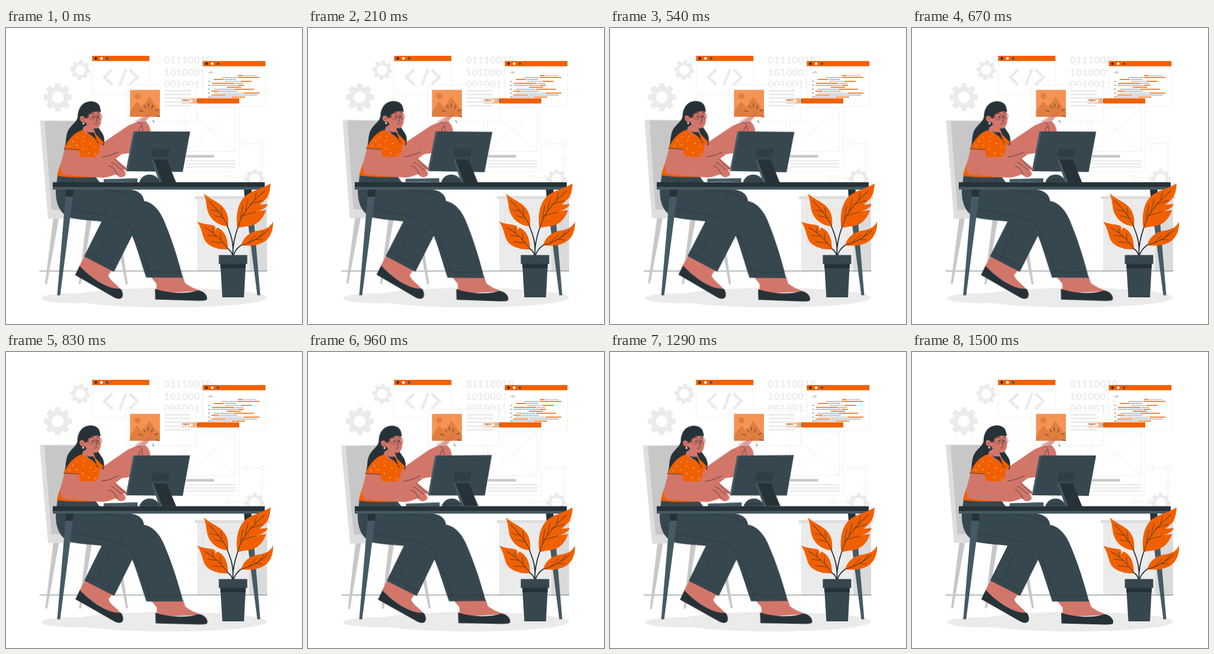
Animation, 500 px wide and 500 px high, one loop 1.54 s. Source, as an HTML page:

```html
<!DOCTYPE html>
<html lang="en">
<head>
<meta charset="utf-8">
<title>At the desk</title>
<style>
html, body { margin: 0; height: 100%; overflow: hidden; background: #fff; }
svg { display: block; width: 100%; height: 100%; }
.body { transform-origin: 200px 292px; }
.device { transform-origin: 238px 218px; }
.or { fill: #f06000; } .dk { fill: #263238; } .md { fill: #37474f; } .lt { fill: #455a64; }
.skin { fill: #d3766a; } .g1 { fill: #ebebeb; } .g2 { fill: #dedede; } .g3 { fill: #c7c7c7; }
.ln { fill: none; stroke: #263238; stroke-linecap: round; stroke-linejoin: round; }
.thin { fill: none; stroke: #ebebeb; }
.win { fill: #fff; stroke: #ebebeb; stroke-width: .7; }
.bin { font: 700 17.5px Lato, sans-serif; fill: #ebebeb; }
</style>
</head>
<body>
<svg viewBox="0 0 500 500">
  <g id="gears" class="g1" fill-rule="evenodd"></g>
  <g class="bin">
    <text x="266.500" y="60">01110010</text>
    <text x="266.500" y="80.500">10100011</text>
    <text x="266.500" y="101">00100110</text>
  </g>

  <!-- wireframe -->
  <path class="thin" stroke-width=".8" d="M407 195.500H429M432.500 199V220.500M432.500 227.500V253H379M400 192h7v7h-7zM429 192h7v7h-7zM429 220.500h7v7h-7zM371.500 249.500h7v7h-7zM400 249.500h7v7h-7z"/>

  <!-- windows -->
  <rect class="win" x="145.500" y="47.500" width="96.700" height="64"/>
  <g class="thin" stroke-width="4.600"><path d="M179.500 70L166 83l13.500 13M208.500 70L222 83l-13.500 13M203 69l-11 28"/></g>
  <rect class="win" x="297" y="119" width="97" height="123.500"/>
  <path class="thin" stroke-width=".8" d="M303.500 135h84v73.500h-84zl84 73.500M387.500 135l-84 73.500"/>
  <rect class="g3" x="304" y="214.500" width="47.500" height="4.300"/>
  <path class="thin" stroke-width="2.500" d="M304 224.300h83.500M304 229.500h83.500M304 234.700h83.500"/>
  <rect class="win" x="332.500" y="56" width="106" height="76"/>
  <g id="bars"></g>
  <text x="341.500" y="77" font-family="Lato, sans-serif" font-size="5" font-weight="700" fill="#f06000">&lt;<tspan fill="#263238">/</tspan>&gt;</text>
  <g id="code" fill="none" stroke-width="1.500"></g>

  <!-- cabinet -->
  <path class="g1" d="M323 288h88v123h-88z"/>
  <path fill="#dadada" d="M411 288h30v123h-30z"/>
  <path class="g2" d="M319 284h126v5H319z"/>
  <path fill="none" stroke="#dcdcdc" stroke-width=".8" d="M332.500 305.500h69v59.500h-69z"/>
  <path class="g3" d="M357 365h15v9h-15z"/>
  <path class="ln" stroke-width=".6" d="M57 410.500H441"/>
  <g class="g1"><ellipse cx="117" cy="456.500" rx="58" ry="8.500"/><ellipse cx="275" cy="455.500" rx="166" ry="16.500"/></g>

  <g class="body">
    <!-- chair -->
    <path class="g3" d="M80 321h9.500L69.500 433H66zM136.500 321h9L126.500 433H123zM180 321h9l17 112h-3.500z"/>
    <path class="g2" d="M57 156.500h70L149 322.500H71z"/>
    <path class="g3" d="M65 157.500h62l20 150H77z"/>

    <!-- far leg and feet -->
    <path class="skin" d="M133 386l46 23-6 9c3 9 15 15 21 24-16 1-47-17-70-40z"/>
    <path class="dk" d="M124.500 402c20 21 48 39 66.500 38.500 4-1.500 7 6 6.500 11-.5 6.500-7 7.500-14 4L117 417.500z"/>
    <path class="md" d="M163 324l-31 62 50.500 26 31-62-14-24z"/>
    <path class="ln" stroke-width=".7" d="M136.500 379l49 25M179 333c-12 18-19 33-24 48"/>
    <path class="skin" d="M244 419h55l3.500 11c8 7 18 10 26 14l-74 4v-16z"/>
    <path class="dk" d="M252 440.500c24 8 54 9 73 2.500 9 1 15 7 15 13.500 0 3.500-3 4-15 4l-72.500-2z"/>

    <!-- near leg -->
    <path class="md" d="M87 249l64 2 14 19 45 3c14 1 23 10 23 19 14 2 26 15 33 31 14 32 25 68 33 98.500h-62c-9-26-17-56-26-75-4-10-11-13-26-16-25-5-55-5-75-9.500-18-6-26-22-26-46z"/>
    <path class="ln" stroke-width=".7" d="M92 295c18 17 82 18 111 32 14 15 29 52 39 83M236 410.500c22 2 42 2 60 1M98 253c-2 8-3 14-3 20M113 253c-2 8-2 14-1 20M141 254l2 9M165 274c30 1 54 8 66 18"/>

    <!-- raised arm -->
    <path class="skin" d="M150 197l15-4 41-28 16-7 21-16c4-1 4 3 1 6l-8 10c5 4 8 11 8 18l-22 2-11 33-36 5-22 5z"/>
    <path class="ln" stroke-width=".7" d="M222 159c4 0 8 3 8 8M224 175l2-7c2-3 5-1 5 7M228 158l8 1"/>

    <!-- hair, torso, head -->
    <path class="dk" d="M145 124c-13-1-23 8-24 24 0 12-14 16-18 30-3 10-1 18-5.500 27 7 1 13-1 20-5l40-9 7 8c3-9 1-18-4-24l-8-12 6-22c2-9-3-16-13.500-17z"/>
    <path class="or" d="M128 173c-13 3-24 17-30 31l3 12c-9 10-12 22-15 34 20 3 43 3 65 2l-1-30 7-12 2-14 4 1 2-4-15-15-13-6z"/>
    <path class="skin" d="M130 168l9-6 9 8c4 11 6 17 8 20-13-2-23-8-27-16z"/>
    <path class="dk" d="M133 172c5 5 8 5 14 4l16 20-9-2c-3-7-8-12-13-14z"/>
    <path class="or" d="M128 173l10 6 11 7 9 10 4 2 2-4-15-16 5 14-20-10z"/>
    <path class="skin" d="M136 143c4-5 14-7 22-3 2 7 3 12 2.500 17-.5 7-4 13-9 13-6 0-12-3-14-8z"/>
    <path class="dk" d="M160 142c-9-2-17 0-21 5l-4 15-10-3 1-21 20-12c9 1 14 8 14 16z"/>
    <path class="skin" d="M134 153c-3-6-10-5-9.500 0 .5 5 5 8 9 6l4 6 2-13z"/>
    <circle cx="130.500" cy="161.500" r="1.500" fill="#fff"/>
    <g fill="none" stroke="#7a3934" stroke-width=".8"><circle cx="145" cy="150" r="5.300"/><circle cx="157.500" cy="149.500" r="4.600"/><path d="M150.300 149q1.500-1 2.600 0M139.700 150l-9 2M127 153q3 0 4 4"/></g>
    <g class="dk"><ellipse cx="146.500" cy="150.500" rx="1.200" ry="1.800"/><ellipse cx="155.500" cy="150" rx="1.100" ry="1.800"/></g>
    <path class="ln" stroke-width=".8" d="M142 144.500q3-2 6-1M154 143.500q3-1 4 .5M152 151l2 6-3 1M149 162q4 1 6-2"/>
    <g id="flecks" fill="none" stroke="#ffd9b8" stroke-width=".9"></g>
  </g>

  <g class="device">
    <path class="dk" d="M165 256l57-2v6.500h-57z"/>
    <path class="lt" d="M165 255.500l56.500-1.500.5 5-57 2z"/>
    <path class="md" d="M226 259c4-13 25-17 33-1v3h-33z"/>
    <path class="ln" stroke-width=".7" d="M226 258q16-4 33-1"/>
    <path class="md" d="M217 174.800h94L298.500 243 202.500 242z"/>
    <path class="lt" d="M215 175h3.500L205.500 242h-3z"/>
    <path class="lt" d="M246 222h6l15 39h-8z"/>
    <path class="dk" d="M249 222h22.500l16 39H264z"/>
    <path id="vents" class="ln" stroke-width="1.700"/>
  </g>

  <!-- front arm -->
  <g class="body">
    <path class="skin" d="M99 204l23 2 4 12 34 .5c10-4 22-9 33-10.500 5 0 4 4 0 7l-8 6 18 15c3 4 0 6-3 3l-2 0c6 6 5 11 0 12-4 3-9 0-12-4-6 2-13 5-21 6l-20-1-47-4c-7-3-7-16-4-25z"/>
    <path class="ln" stroke-width=".8" d="M162 218c10-1 20-5 28-9M184 221c5 6 10 12 18 17M178 227c8 3 12 10 18 13M174 233c8 2 11 9 14 15M98 204.500l25 1.500"/>
  </g>

  <!-- picture card -->
  <rect x="202.500" y="96.500" width="120" height="61.500" fill="#fff" fill-opacity=".52" stroke="#ebebeb" stroke-width=".7"/>
  <path class="or" opacity=".67" d="M209.500 104.500h50.500v45.500h-50.500z"/>
  <g fill="#c96527" opacity=".45"><circle cx="222" cy="115.500" r="5"/><path d="M209.500 141l12-17 9 10 11.500-18 18 25v9h-50.500z"/></g>
  <path class="thin" stroke-width="3" d="M268 106h44M268 112.300h44M268 118.600h44M268 125h44M268 131.300h44"/>
  <g class="body">
    <path class="skin" opacity=".45" d="M216 158l26-15c4-1 4 3 1 6l-9 9z"/>
    <path class="ln" stroke-width=".9" d="M225 139l6 2M232 130l4 5M240 127.500l.5 5.500M248 130l-2 6M252 139.500l6-2M254 148.500l5 1.500M248 155.500l2 4"/>
  </g>

  <!-- desk -->
  <path class="dk" d="M101 272h13l-1 13h-12zM402 272h12.500l1 13H403z"/>
  <path class="lt" d="M100.500 285h12.500L91.500 451.500h-5zM403 285h12.500l14 166.500h-5z"/>
  <path class="lt" d="M79 268h358v5H79z"/>
  <path class="dk" d="M79 260.500h358v8H79z"/>

  <!-- plant -->
  <g class="or">
    <path d="M375 335c-17-1-31-12-35-28-2-10-2-18-6-27.500 12 10 19 12 27 18 12 9 16 22 14 37.500z"/>
    <path d="M391 339c-3-19-1-39 10-52 12-13 31-15 46-24.500-1 13-3 23-10 28-4 4-6 6-9 8l14-1c-2 6-10 10-18 12l15-2c-2 9-10 21-21 25-10 4-20 2-27 6.500z"/>
    <path d="M375 374c-20 0-35-6-40-17-4-10-5-20-12-30 10 5 20 4 29 7 2 2 2 5 1 8l4-5c14 6 18 21 18 37z"/>
    <path d="M397 367c5-15 15-23 31-25 11-2 19-6 23-15 1 13-4 25-11 31-10 9-26 11-43 9z"/>
  </g>
  <g class="ln">
    <path stroke-width="1.800" d="M383 385c2-22-3-36-9-50M383 385c0-18 3-32 8-46M383 385q-2-8-8-12M384 385q3-11 13-18"/>
    <path stroke-width="1" d="M375 335c-7-15-19-29-32-43M391 339c6-24 23-44 46-64M375 373c-10-14-23-27-39-36M397 367c15-4 32-12 45-25"/>
    <path stroke-width=".7" d="M368 321l-16-4M360 310l-14-3M365 316l-2-12M396 322l4-22M404 309l5-20M399 317l22-6M411 298l22-7M420 290l3-12M367 363l-19-2M356 352l-15-2M363 358l-1-12M350 346l-1-8M409 363l14-14M421 357l12 1M427 354l9-11"/>
  </g>
  <path class="md" d="M362 398h43l-3 57h-36.500z"/>
  <path class="dk" d="M362 398h43l-.5 8h-42z"/>
  <path class="md" d="M359.500 383.500h48v15h-48z"/>
</svg>
<script>
const $ = id => document.getElementById(id);
const add = (id, html) => $(id).insertAdjacentHTML('beforeend', html);

// x, y, outer radius, hole radius, tilt
function gear(x, y, r, hole, tilt) {
  const pts = [];
  const at = (a, q) => pts.push((x + q * Math.sin(a)).toFixed(1) + ' ' + (y - q * Math.cos(a)).toFixed(1));
  for (let i = 0; i < 8; i++) {
    const a = tilt + i * Math.PI / 4;
    at(a - .27, r * .77); at(a - .19, r);
    at(a + .19, r); at(a + .27, r * .77);
  }
  add('gears', `<path d="M${pts.join('L')}ZM${x - hole} ${y}a${hole} ${hole} 0 1 0 ${2 * hole} 0a${hole} ${hole} 0 1 0 ${-2 * hole} 0"/>`);
}
gear(87.5, 117, 24, 10, 0);
gear(125.5, 71, 17, 8.5, .12);
gear(420, 255, 17, 9, 0);

function bar(x, y, w) {
  const dots = ['#263238', '#fff', '#455a64'].map((c, i) =>
    `<circle cx="${x + 6.2 + i * 9.6}" cy="${y + 4.4}" r="2.3" fill="${c}"/>`).join('');
  add('bars', `<rect class="or" x="${x}" y="${y}" width="${w}" height="8.800"/>${dots}`);
}
bar(145.5, 47, 96.7);
bar(297, 118.7, 97);
bar(332.5, 55.8, 105.7);

// start, colour switch and end of each code line
[[392, 400, 423], [365, 390, 428], [351, 368, 389], [370, 395, 415], [348, 386, 401], [347, 390, 402],
 [373, 397, 397], [351, 384, 419], [347, 360, 390], [351, 400, 428], [347, 372, 424], [342, 380, 404]
].forEach(([a, b, c], i) => {
  const y = 80.3 + i * 3.3, tones = i % 3 ? ['#f06000', '#a9b0b3'] : ['#f06000', '#bfc4c6'];
  if (i % 2) tones.reverse();
  add('code', `<path stroke="${tones[0]}" d="M${a} ${y}H${b}"/><path stroke="${tones[1]}" d="M${b + 1} ${y}H${Math.max(c, b + 1)}"/>`);
  if (i > 2 && i % 2) add('code', `<path stroke="#8b9498" d="M341.500 ${y}h3"/>`);
});

$('vents').setAttribute('d', Array.from({ length: 7 }, (_, i) => `M${250 + i * 4.1} 204.500l-2.500 12.500`).join(''));

[[112, 190], [121, 184], [106, 199], [119, 197], [131, 190], [141, 195], [129, 203], [151, 200],
 [138, 211], [150, 212], [133, 183], [94, 240], [99, 230]].forEach(([x, y], i) =>
  add('flecks', `<path d="M${x} ${y}l${[2, -2, 3][i % 3]} ${[3, 2, 1][i % 3]}"/>`));

// gentle sway: 0, +1, -1, 0 degrees over 36 steps, then one step at rest
const STEPS = 37;
const angle = i => i <= 9 ? i / 9 : i <= 27 ? 2 - i / 9 : i / 9 - 4;
const sway = Array.from({ length: STEPS + 1 }, (_, i) => ({
  offset: i / STEPS,
  transform: `rotate(${angle(i % STEPS)}deg)`,
  easing: 'steps(1)'
}));
document.querySelectorAll('.body, .device').forEach(el => {
  el.animate(sway, { duration: 1540, iterations: Infinity }).startTime = 0;
});
</script>
</body>
</html>
```
